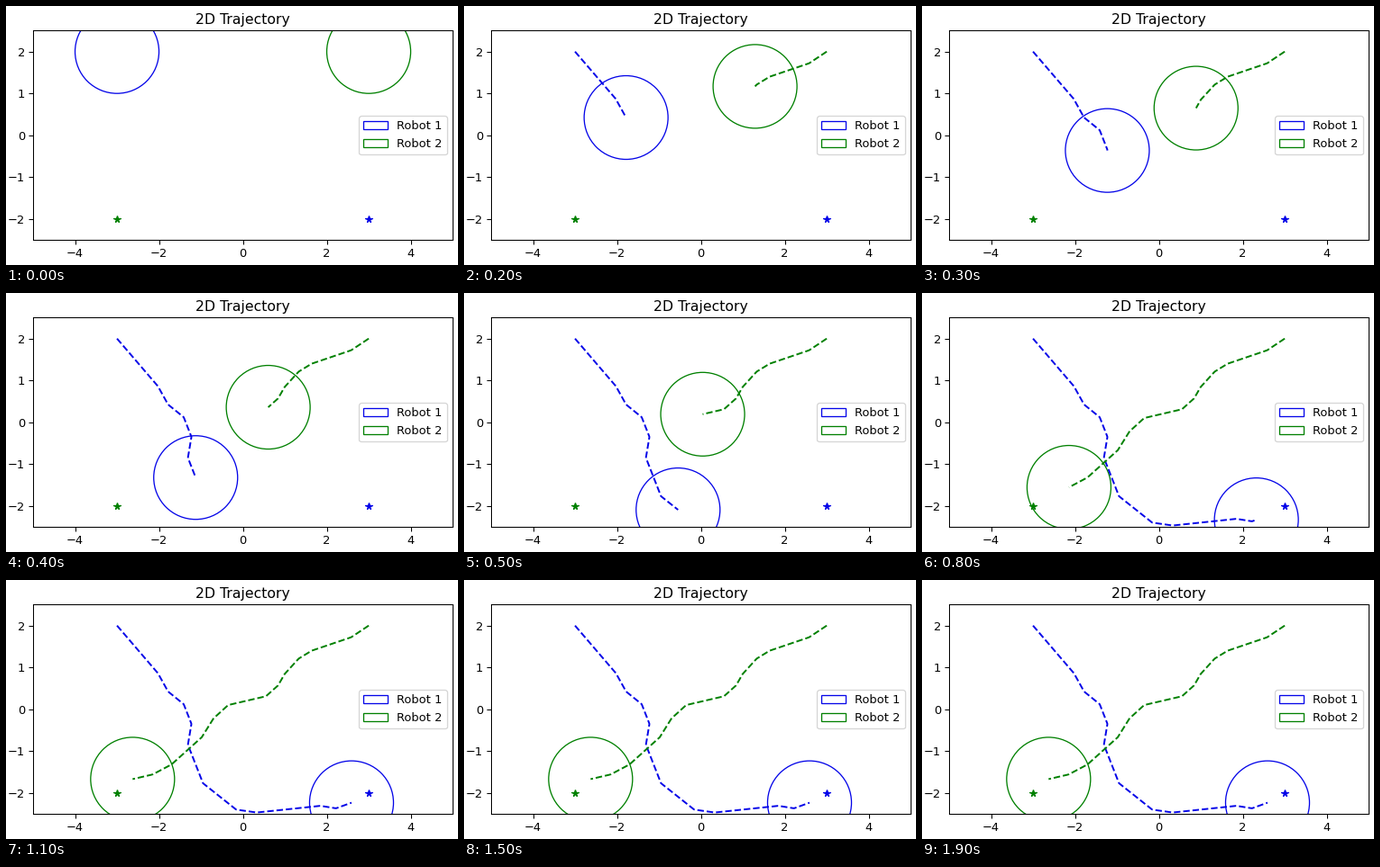
Recreate the animation shown at these times as a matplotlib script. Size 501 by 288 pixels, loop 2000 ms.

```python
import numpy as np
import matplotlib.pyplot as plt
from matplotlib.animation import FuncAnimation

W, H, DPI = 501, 288, 96
K = 93.75 / DPI  # scale of all point sizes

plt.rcParams.update({
    "font.family": "DejaVu Sans",
    "font.size": 10 * K,
    "axes.titlesize": 12 * K,
    "axes.titlepad": 6 * K,
    "axes.linewidth": 0.8 * K,
    "lines.linewidth": 1.5 * K,
    "lines.markersize": 6 * K,
    "patch.linewidth": 1.0 * K,
    "legend.fontsize": 10 * K,
})
for axis in ("xtick", "ytick"):
    plt.rcParams.update({
        f"{axis}.labelsize": 10 * K,
        f"{axis}.major.size": 3.5 * K,
        f"{axis}.major.width": 0.8 * K,
        f"{axis}.major.pad": 3.5 * K,
    })

STEPS, SUB = 17, 20          # simulation steps, samples per step
STEPS_PER_FRAME = 2
SPEED = 0.5                  # units per step

# Corners of the routes
ROUTE_1 = [(-3, 2), (-2.03, 0.87), (-1.785, 0.425), (-1.41, 0.12),
           (-1.226, -0.35), (-1.31, -0.85), (-0.95, -1.77), (-0.16, -2.4),
           (0.33, -2.47), (1.85, -2.31), (2.22, -2.37), (2.59, -2.235)]
ROUTE_2 = [(3, 2), (2.58, 1.72), (1.64, 1.4), (1.33, 1.21), (1, 0.85),
           (0.845, 0.575), (0.55, 0.31), (-0.35, 0.1), (-0.7, -0.22),
           (-0.98, -0.67), (-1.7, -1.32), (-2.15, -1.56), (-2.645, -1.675)]


def drive(route, braking):
    """Follow a route at cruise speed, braking around step 7."""
    corners = np.array(route)
    lengths = np.hypot(*np.diff(corners, axis=0).T)
    marks = np.concatenate([[0], np.cumsum(lengths)])
    mid = (np.arange(STEPS * SUB) + 0.5) / SUB
    speed = SPEED - braking * np.exp(-((mid - 7.2) / 2.8) ** 2)
    dist = np.concatenate([[0], np.cumsum(speed) / SUB])
    return np.column_stack([np.interp(dist, marks, c) for c in corners.T])


fig = plt.figure(figsize=(W / DPI, H / DPI), dpi=DPI, facecolor="white")
ax = fig.add_axes([30.05 / W, 1 - 259.95 / H, 465 / W, 232.5 / H])
ax.set(xlim=(-5, 5), ylim=(-2.5, 2.5), title="2D Trajectory",
       xticks=range(-4, 5, 2), yticks=range(-2, 3))


def add_robot(path, goal, color, label):
    body = plt.Circle(path[0], 1, color=color, fill=False, label=label)
    ax.add_patch(body)
    trail, = ax.plot([], [], "--", color=color)
    ax.plot(*goal, "*", color=color, mew=K)
    return path, body, trail


robots = [
    add_robot(drive(ROUTE_1, 0), (3, -2), "#0404e8", "Robot 1"),
    add_robot(drive(ROUTE_2, 0.31), (-3, -2), "green", "Robot 2"),
]
ax.legend(loc="center right")


def update(i):
    now = min(i * STEPS_PER_FRAME, STEPS) * SUB
    for path, body, trail in robots:
        body.center = path[now]
        trail.set_data(*path[:now + 1].T)
    return [artist for robot in robots for artist in robot[1:]]


anim = FuncAnimation(fig, update, frames=20, interval=100, repeat=True,
                     repeat_delay=0, blit=False)
plt.show()
```
